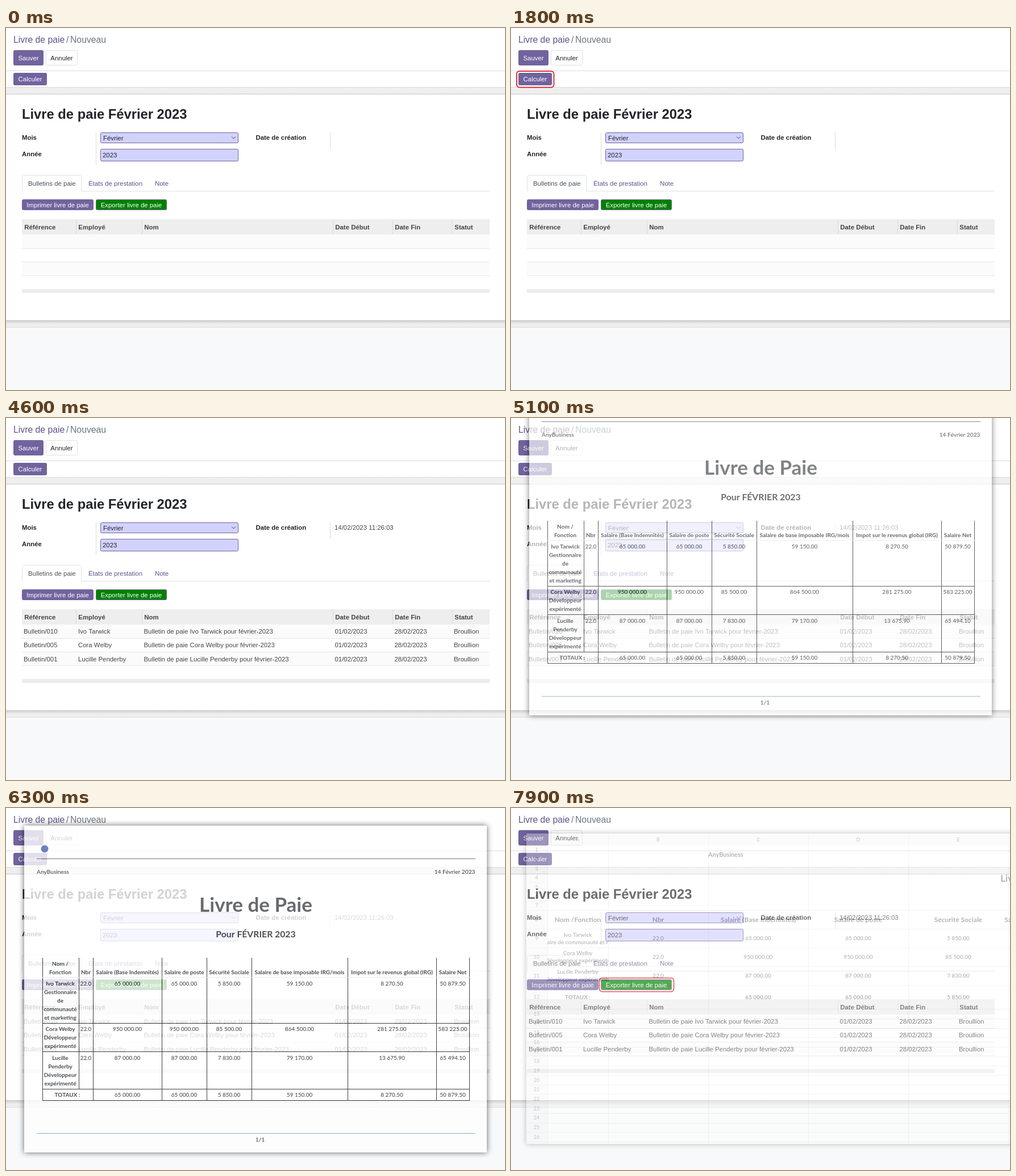
Recreate the animation shown at these times as an HTML page with a canvas. Size 878 by 638 pixels, loop 8 s.

```html
<!DOCTYPE html>
<html lang="fr">
<head>
<meta charset="utf-8">
<title>Livre de paie</title>
<style>
html, body { margin: 0; width: 100%; height: 100%; overflow: hidden; background: #f8f9fa; }
canvas { display: block; }
</style>
</head>
<body>
<canvas id="stage" width="878" height="638"></canvas>
<script>
const W = 878, H = 638, LOOP = 8000;
const ARIAL = '"Liberation Sans", Arial, sans-serif';
const LATO = 'Lato, sans-serif';
const PURPLE = '#71639e', LINK = '#5f5386', INK = '#212529', GREY = '#444', RED = '#e0191f';
const COMPANY = 'AnyBusiness';
const JOB = ['Développeur', 'expérimenté'];
const STAFF = [
  { ref: '010', name: 'Ivo Tarwick', nameLines: ['Ivo Tarwick'],
    job: ['Gestionnaire', 'de', 'communauté', 'et marketing'],
    pay: ['65 000.00', '65 000.00', '5 850.00', '59 150.00', '8 270.50', '50 879.50'] },
  { ref: '005', name: 'Cora Welby', nameLines: ['Cora Welby'], job: JOB,
    pay: ['950 000.00', '950 000.00', '85 500.00', '864 500.00', '281 275.00', '583 225.00'] },
  { ref: '001', name: 'Lucille Penderby', nameLines: ['Lucille', 'Penderby'], job: JOB,
    pay: ['87 000.00', '87 000.00', '7 830.00', '79 170.00', '13 675.90', '65 494.10'] }
];
const TOTALS = STAFF[0].pay;
const PAY_HEADS = ['Salaire (Base Indemnités)', 'Salaire de poste', 'Sécurité Sociale',
  'Salaire de base imposable IRG/mois', 'Impot sur le revenus global (IRG)', 'Salaire Net'];

const screen = document.getElementById('stage').getContext('2d');
let g = screen;

function layer(paint) {
  const canvas = document.createElement('canvas');
  canvas.width = W;
  canvas.height = H;
  g = canvas.getContext('2d');
  paint();
  g = screen;
  return canvas;
}

// cy is the middle of the capital letters; baselines sit on whole pixels
function text(str, x, cy, { size = 11.4, color = GREY, weight = 400, align = 'left', family = ARIAL } = {}) {
  g.font = `${weight} ${size}px ${family}`;
  g.fillStyle = color;
  g.textAlign = align;
  g.fillText(str, x, Math.round(cy + size * 0.36));
}

function lato(str, x, cy, options) {
  text(str, x, cy, { size: 10, color: INK, weight: 500, align: 'center', family: LATO, ...options });
}

function rect(x, y, w, h, color) {
  g.fillStyle = color;
  g.fillRect(x, y, w, h);
}

function rounded(x, y, w, h, r, fill, stroke, width = 1) {
  g.beginPath();
  g.roundRect(x, y, w, h, r);
  if (fill) { g.fillStyle = fill; g.fill(); }
  if (stroke) { g.strokeStyle = stroke; g.lineWidth = width; g.stroke(); }
}

const hLine = (x1, x2, y, color) => rect(x1, y, x2 - x1, 1, color);
const vLine = (x, y1, y2, color) => rect(x, y1, 1, y2 - y1, color);

function button(label, x, y, w, h, fill, stroke, color = '#fff') {
  rounded(x + 0.5, y + 0.5, w - 1, h - 1, 2, fill, stroke);
  text(label, x + w / 2, y + h / 2, { color, align: 'center' });
}

function hatch(y, h) {
  rect(0, y, W, h, '#f6f6f6');
  g.save();
  g.beginPath();
  g.rect(0, y, W, h);
  g.clip();
  g.strokeStyle = '#e0e0e0';
  g.lineWidth = 0.8;
  g.beginPath();
  for (let x = -h; x < W + h; x += 4) {
    g.moveTo(x, y); g.lineTo(x + h, y + h);
    g.moveTo(x + h, y); g.lineTo(x, y + h);
  }
  g.stroke();
  g.restore();
}

function paper(x, y, w, h) {
  g.save();
  g.shadowColor = 'rgba(0,0,0,.75)';
  g.shadowBlur = 10;
  rect(x, y, w, h, '#fff');
  g.restore();
}

function fields(edge, labelColor) {
  text('Mois', 28, 192.5, { weight: 700, color: labelColor });
  text('Année', 28, 221.5, { weight: 700, color: labelColor });
  rounded(166.5, 184.5, 242, 18, 2, '#d2d2ff', edge);
  rounded(166.5, 213.5, 242, 21, 2, '#d2d2ff', edge);
  text('Février', 171, 193.5, { color: INK });
  text('2023', 170, 224, { color: INK });
  g.strokeStyle = '#444';
  g.lineWidth = 1;
  g.beginPath();
  g.moveTo(397, 191.5);
  g.lineTo(400.5, 195);
  g.lineTo(404, 191.5);
  g.stroke();
}

function paintForm() {
  rect(0, 0, W, H, '#f8f9fa');
  rect(0, 0, W, 105, '#fff');
  text('Livre de paie', 13, 20, { size: 15.75, color: LINK });
  text('/', 106, 20, { size: 15.75, color: '#6c757d' });
  text('Nouveau', 113, 20, { size: 15.75, color: '#6c757d' });
  button('Sauver', 13, 39, 53, 27, PURPLE, PURPLE);
  button('Annuler', 70, 39, 56, 27, '#fff', '#dee0e3', INK);
  hLine(0, W, 75, '#dcdcdc');
  button('Calculer', 13, 79, 59, 22, PURPLE, PURPLE);
  hLine(0, W, 104, '#dcdcdc');

  hatch(105, 11);
  hatch(516, 11);
  hLine(0, W, 527, '#dedede');
  const shade = g.createLinearGradient(0, 516, 0, 522);
  shade.addColorStop(0, 'rgba(0,0,0,.12)');
  shade.addColorStop(1, 'rgba(0,0,0,0)');
  rect(0, 516, W, 6, shade);
  rect(0, 117, W, 399, '#fff');
  hLine(0, W, 116, '#c9c9c9');
  hLine(0, W, 515, '#c9c9c9');

  text('Livre de paie Février 2023', 28, 151, { size: 23.75, weight: 700, color: INK });
  fields(PURPLE, INK);
  vLine(158, 184, 241, '#dcdcdc');
  vLine(570, 184, 213, '#dcdcdc');
  text('Date de création', 439.5, 192.5, { weight: 700, color: INK });

  hLine(28, 851, 287, '#dee2e6');
  rounded(28.5, 259.5, 104, 32, 3, '#fff', '#dee2e6');
  rect(28, 288, 106, 5, '#fff');
  text('Bulletins de paie', 39, 273.5, { color: '#495057' });
  text('États de prestation', 145, 273.5, { color: LINK });
  text('Note', 262, 273.5, { color: LINK });
  button('Imprimer livre de paie', 28, 302, 126, 19, PURPLE, PURPLE);
  button('Exporter livre de paie', 158, 302, 125, 19, '#008000', PURPLE);

  rect(28, 337, 823, 27, '#eee');
  const heads = ['Référence', 'Employé', 'Nom', 'Date Début', 'Date Fin', 'Statut'];
  [28, 123, 239, 575, 680, 785].forEach((x, i) => {
    if (i) vLine(x, 338, 363, '#dcdcdc');
    text(heads[i], x + 4.3, 350.5, { weight: 700 });
  });
  rect(28, 364, 823, 24, '#fbfbfb');
  rect(28, 412, 823, 24, '#fbfbfb');
  for (let y = 388; y < 440; y += 24) hLine(28, 851, y, '#e4e6e8');
  rect(28, 460, 823, 7, '#ececec');
}

function paintEntries() {
  text('14/02/2023 11:26:03', 578, 192.5);
  STAFF.forEach(({ ref, name }, i) => {
    const y = 376 + i * 24.2;
    text('Bulletin/' + ref, 31, y);
    text(name, 127, y);
    text(`Bulletin de paie ${name} pour février-2023`, 242.5, y);
    text('01/02/2023', 578.5, y);
    text('28/02/2023', 683.5, y);
    text('Broullion', 788, y);
  });
}

function paintReport() {
  paper(32, 31, 814, 576);
  g.fillStyle = '#4a62b5';
  g.beginPath();
  g.arc(68, 72, 6.5, 0, 2 * Math.PI);
  g.fill();
  hLine(54, 826, 89, '#555');
  lato(COMPANY, 54, 112, { align: 'left', size: 10.2 });
  lato('14 Février 2023', 825.5, 112, { align: 'right', size: 10.2 });
  lato('Livre de Paie', 439.5, 170, { size: 35, weight: 700, color: '#42464a' });
  lato('Pour FÉVRIER 2023', 439.5, 222.5, { size: 15.75, weight: 700 });

  const edges = [64, 128, 153, 274, 353, 432, 601, 757, 815];
  edges.forEach((x, i) => vLine(x, 264, i === 1 ? 495 : 516, '#111'));
  hLine(64, 816, 298, '#e6e6e6');
  for (const y of [379, 429, 495, 515]) hLine(64, 816, y, '#111');

  const center = i => (edges[i] + edges[i + 1]) / 2;
  const bold = { weight: 700 };
  const payRow = (values, y, options) => values.forEach((v, i) => lato(v, center(i + 2), y, options));
  lato('Nom /', 95.5, 274, bold);
  lato('Fonction', 95.5, 289, bold);
  lato('Nbr', 140.5, 289, bold);
  payRow(PAY_HEADS, 289, bold);
  const tops = [309.5, 389.5, 440];
  STAFF.forEach((person, row) => {
    [...person.nameLines, ...person.job].forEach((line, i) => lato(line, 95.5, tops[row] + i * 15, bold));
    lato('22.0', 140.5, tops[row]);
    payRow(person.pay, tops[row]);
  });
  lato('TOTAUX :', 108, 505.5, bold);
  payRow(TOTALS, 505.5);

  hLine(54, 826, 573, '#6f9fbf');
  lato('1/1', 447, 584, { size: 10.2 });
}

function paintSpreadsheet() {
  const grid = '#dedede', top = 45, bottom = 592;
  paper(27, top, W, bottom - top);
  rect(27, top, W, 21, '#f5f5f5');
  rect(27, top, 37, bottom - top, '#f5f5f5');

  const columnX = i => i ? 171 + (i - 1) * 176 : 64;
  const center = i => (columnX(i) + columnX(i + 1)) / 2;
  for (let i = 0; i < 6; i++) {
    vLine(columnX(i), top, bottom, grid);
    lato('ABCDEF'[i], center(i), 55.5, { size: 9, color: '#666' });
  }
  const rowHeight = n => n < 8 ? 16.3 : n < 12 ? 33 : n === 12 ? 42 : 16.7;
  let y = 66;
  for (let n = 1; n <= 26; n++) {
    const h = rowHeight(n);
    hLine(27, n < 8 ? 64 : W, Math.round(y), grid);
    lato(n, 45, y + h / 2, { size: 9, color: '#666' });
    y += h;
  }
  hLine(27, W, Math.round(y), grid);

  const bold = { weight: 700 };
  const head = { weight: 700, size: 12 };
  lato(COMPANY, 347, 82, { ...bold, size: 10.9, align: 'left' });
  lato('Livre de Paie', 861, 123.5, { ...bold, size: 17, align: 'left' });
  ['Nom /Fonction', 'Nbr', ...PAY_HEADS.slice(0, 4)].forEach((label, i) => lato(label, center(i), 197, head));
  STAFF.forEach(({ name, job, pay }, row) => {
    const cy = 229.5 + row * 32.8;
    lato('22.0', center(1), cy);
    pay.slice(0, 3).forEach((v, i) => lato(v, center(i + 2), cy));
    g.save();
    g.beginPath();
    g.rect(64, 180, 107, 132);
    g.clip();
    lato(name, center(0), cy - 6.5);
    lato(job.join(' '), center(0), cy + 6.5);
    g.restore();
  });
  lato('TOTAUX :', center(0), 333, bold);
  TOTALS.slice(0, 3).forEach((v, i) => lato(v, center(i + 2), 333, bold));
}

const form = layer(paintForm);
const entries = layer(paintEntries);
const report = layer(paintReport);
const spreadsheet = layer(paintSpreadsheet);

const between = (t, from, to) => t >= from && t < to;
const blink = (t, start) => between(t, start, start + 200) || between(t, start + 400, start + 600);
// Progress in n jumps of 100 ms, the first one at start
const steps = (t, start, n) => Math.max(0, Math.min(n, Math.floor((t - start) / 100) + 1)) / n;

function show(image, alpha, y = 0) {
  if (alpha <= 0) return;
  g.globalAlpha = alpha;
  g.drawImage(image, 0, y);
  g.globalAlpha = 1;
}

const highlight = (x, y, w, h) => rounded(x, y, w, h, 5, null, RED, 1.75);

function draw(t) {
  show(form, 1);
  if (blink(t, 1000)) fields(RED, RED);
  if (blink(t, 1800)) highlight(10, 76, 65.5, 28.5);
  show(entries, steps(t, 2600, 5));
  if (blink(t, 4000)) highlight(24.5, 299.5, 133.5, 24);
  if (between(t, 7200, 7400) || t >= 7600) highlight(155.5, 299.5, 131, 24);

  const arrival = steps(t, 4800, 6);
  const departure = steps(t, 6300, 5);
  show(report, arrival * (1 - departure), Math.round(-250 * (1 - arrival)));
  show(spreadsheet, steps(t, 7800, 6));
}

function tick() {
  draw(performance.now() % LOOP);
  requestAnimationFrame(tick);
}
tick();
</script>
</body>
</html>
```
